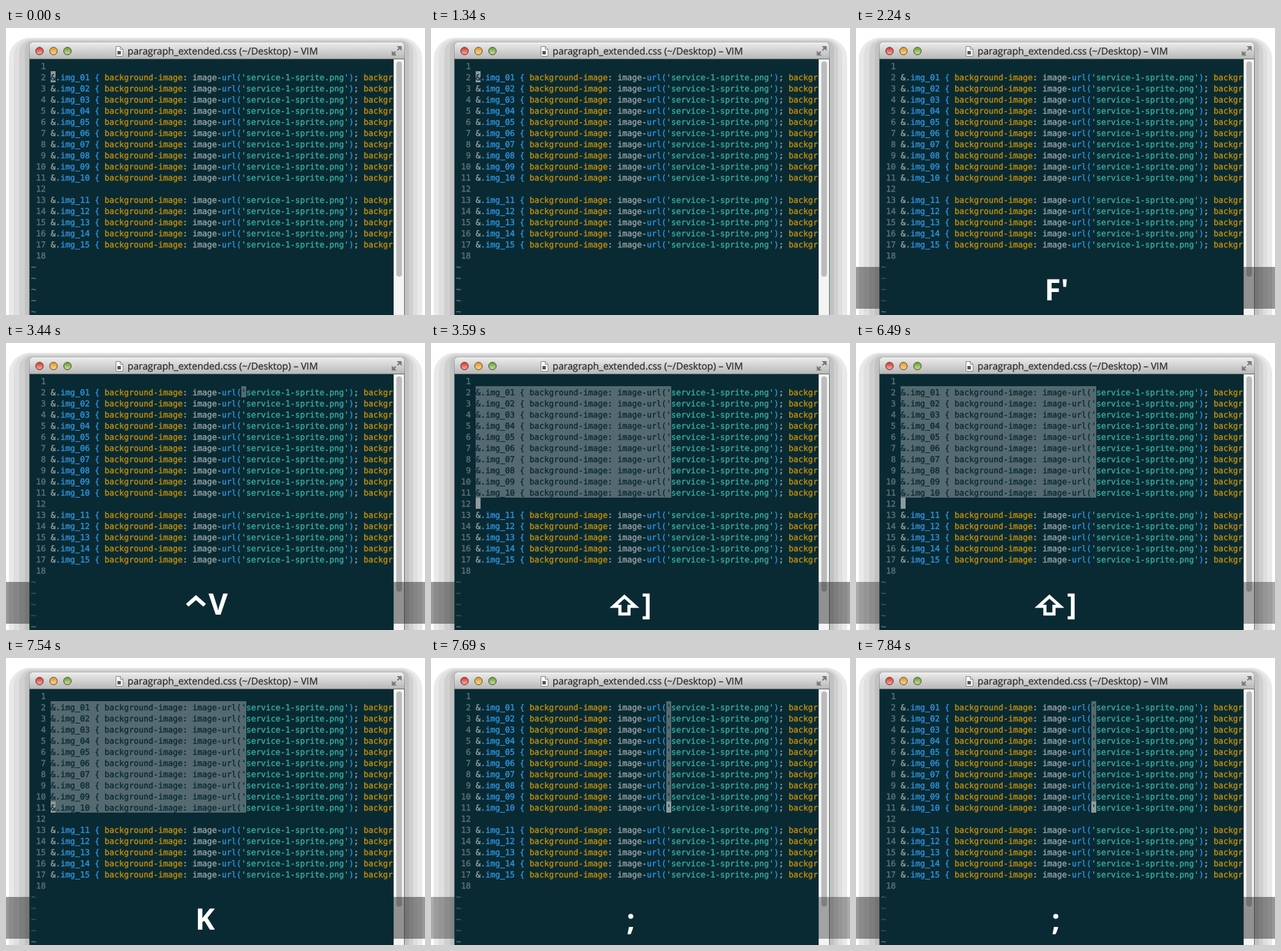
Animation of 600 by 412 pixels, one loop 8000 ms. Source, as an HTML page:

```html
<!DOCTYPE html>
<html lang="en">
<head>
<meta charset="utf-8">
<title>Vim block selection</title>
<style>
  html, body { margin: 0; width: 100%; height: 100%; overflow: hidden; background: #fff; }
  svg { display: block; width: 600px; height: 412px; }
  text { white-space: pre; text-rendering: geometricPrecision; }
  .mono { font: 11.63px "DejaVu Sans Mono", monospace; color: #98a5a5; }
  .mono text, .mono tspan { fill: currentColor; stroke: currentColor; stroke-width: .35px; }
  .dark { color: #0a2a33; }
  .num { color: #5d7379; text-anchor: end; }
  .tilde { color: #647b83; }
  .b { color: #2c95e0; }
  .y { color: #c09008; }
  .c { color: #38aca0; }
  .title { font: 13.77px "Open Sans", "Noto Sans", sans-serif; fill: #2a2a2a; stroke: #2a2a2a; stroke-width: .25px; }
  .key { font: bold 42.5px "Open Sans", "Noto Sans", sans-serif; fill: #fff; }
  .key path { fill: none; stroke: #fff; }
  .note { font: 16.8px "Liberation Sans", Arial, sans-serif; fill: #fb5f43; }
</style>
</head>
<body>
<svg viewBox="0 0 600 412">
  <defs>
    <linearGradient id="bar" x2="0" y2="1">
      <stop offset="0" stop-color="#ececec"/>
      <stop offset="1" stop-color="#b6b6b6"/>
    </linearGradient>
    <linearGradient id="gloss" x2="0" y2="1">
      <stop offset="0" stop-color="#fff" stop-opacity="0"/>
      <stop offset="1" stop-color="#fff" stop-opacity=".6"/>
    </linearGradient>
    <clipPath id="selClip"><rect id="selBox"/></clipPath>
    <clipPath id="curClip"><rect id="curBox"/></clipPath>
    <g id="plain" class="mono dark"></g>
  </defs>

  <!-- window shadow -->
  <rect x="4" y="14" width="592" height="460" rx="30" fill="#e9e9e9"/>
  <rect x="11" y="15" width="578" height="460" rx="25" fill="#dfdfdf"/>
  <rect x="19" y="17" width="564" height="460" rx="18" fill="#d0d0d0"/>
  <rect x="27" y="19" width="550" height="460" rx="11" fill="#c2c2c2"/>

  <!-- window -->
  <path d="M33.5 412V26q0-5 5-5H565.5q5 0 5 5V412z" fill="#0a2a33"/>
  <path d="M33.5 45V26q0-5 5-5H565.5q5 0 5 5V45z" fill="url(#bar)"/>
  <path d="M33.5 44.5H570.5" stroke="#6c6c6c"/>
  <path d="M37 21.5H567" stroke="#f6f6f6"/>
  <g id="lights"></g>
  <path d="M157.5 26.5h6l4 4v10h-10z" fill="#fff" stroke="#8a8a8a"/>
  <path d="M163.5 26.5v4h4" fill="none" stroke="#8a8a8a"/>
  <path d="M159.5 33h5v5h-5z" fill="#555"/>
  <text class="title" x="174" y="38">paragraph_extended.css (~/Desktop) – VIM</text>
  <g fill="#777" stroke="#777" stroke-width="1.8">
    <path d="M560.5 32l4-4M558 34l-4 4"/>
    <path d="M559.5 26h7v7zM552.5 32.5v7h7z" stroke="none"/>
  </g>

  <!-- scroll bar -->
  <rect x="555" y="45" width="15" height="367" fill="#f4f4f4"/>
  <path d="M555.5 45V412" stroke="#dcdcdc"/>
  <rect x="559" y="48" width="8" height="309" rx="4" fill="#bcbcbc"/>

  <g id="code" class="mono"></g>
  <g clip-path="url(#selClip)">
    <rect width="600" height="412" fill="#546a70"/>
    <use href="#plain"/>
  </g>
  <g id="cursor" clip-path="url(#curClip)">
    <rect width="600" height="412" fill="#8e9b9c"/>
    <use href="#plain"/>
  </g>

  <!-- pressed keys -->
  <g id="band">
    <rect y="343" width="600" height="60" fill="#1a1a1a"/>
    <rect x="34" y="343" width="521" height="60" fill="#0a2a33"/>
  </g>
  <g id="find" class="key"><text x="270" y="391">F'</text></g>
  <g id="block" class="key">
    <path d="M259.5 376.5L272 365.5L284.5 376.5" stroke-width="5.5"/>
    <text x="290" y="390">V</text>
  </g>
  <g id="para" class="key">
    <path d="M277 364L261.5 378H270.5V389H283.5V378H292.5z" stroke-width="4.5"/>
    <text x="302" y="390">]</text>
  </g>
  <g id="up" class="key"><text x="271" y="390">K</text></g>
  <g id="again" class="key"><text x="280" y="391">;</text></g>

  <g id="note" class="note">
    <path d="M76.5 239L102 249L94.2 254.4L173 337.5L169.3 341L90.5 258L84 264.5z"/>
    <text x="86" y="367">Cursor goes to the first line column</text>
    <text x="86" y="387">when using } motion.</text>
  </g>
</svg>

<script>
const LOOP = 8000, LEFT = 64, COL = 7, ROW = 16, QUOTE = 39;
const $ = id => document.getElementById(id);
const rowTop = row => 46 + ROW * (row - 1);
const text = (x, row, body, cls = '') =>
  `<text x="${x}" y="${rowTop(row) + 13}" class="${cls}">${body}</text>`;

// Each token is [class, text]; one line of the style sheet.
const tokens = n => [
  ['', '&amp;'], ['b', `.img_${n} { `], ['y', 'background-image'], ['', ': image-'],
  ['b', 'url('], ['c', "'service-1-sprite.png'"], ['b', ')'], ['', '; '], ['y', 'backgr']
];

let code = '', plain = '', image = 0;
for (let row = 1; row <= 23; row++) {
  if (row > 18) {
    code += text(36, row, '~', 'tilde');
    continue;
  }
  code += text(57, row, row, 'num');
  if (row === 1 || row === 12 || row === 18) continue;
  const parts = tokens(String(++image).padStart(2, '0'));
  code += text(LEFT, row, parts.map(([c, s]) => `<tspan class="${c}">${s}</tspan>`).join(''));
  plain += text(LEFT, row, parts.map(p => p[1]).join(''));
}
$('code').innerHTML = code;
$('plain').innerHTML = plain;

$('lights').innerHTML = ['#d8392f', '#dd9a22', '#6da232'].map((fill, i) => {
  const at = `cx="${48 + 20 * i}" cy="33"`;
  return `<circle ${at} r="5.5" fill="${fill}" stroke="#5a4a3c" stroke-opacity=".8"/>
    <circle ${at} r="4.5" fill="url(#gloss)"/>`;
}).join('');

// Boxes are [first column, first row, columns, rows].
const cell = (col, row) => [col, row, 1, 1];
const WIDE = [0, 2, QUOTE + 1, 10], NARROW = [QUOTE, 2, 1, 10];
const FULL = 0.45, SOFT = 0.37;

// Each step changes only the properties it names.
const steps = [
  [0, { cur: cell(0, 2), on: 1, sel: null, band: 0, key: '', note: 0 }],
  [450, { on: 0 }],
  [590, { on: 1 }],
  [1040, { on: 0 }],
  [1340, { on: 1 }],
  [1490, { cur: cell(QUOTE, 2), band: SOFT, key: 'find' }],
  [1640, { band: FULL }],
  [2240, { on: 0 }],
  [2540, { on: 1, band: SOFT }],
  [2690, { sel: cell(QUOTE, 2), band: FULL, key: 'block' }],
  [3440, { on: 0 }],
  [3590, { cur: cell(0, 12), on: 1, sel: WIDE, key: 'para' }],
  [4190, { on: 0 }],
  [4490, { on: 1, key: '', note: 1 }],
  [6490, { band: SOFT, key: 'para', note: 0 }],
  [6640, { cur: cell(0, 11), key: 'up' }],
  [6790, { band: FULL }],
  [7240, { on: 0 }],
  [7540, { on: 1 }],
  [7690, { cur: cell(QUOTE, 11), sel: NARROW, band: SOFT, key: 'again' }],
  [7840, { band: FULL }]
];

function place(id, box) {
  const [col, row, cols, rows] = box || [0, 0, 0, 0];
  const attrs = { x: LEFT + col * COL, y: rowTop(row), width: cols * COL, height: rows * ROW };
  for (const name in attrs) $(id).setAttribute(name, attrs[name]);
}
const show = (id, on) => { $(id).style.display = on ? '' : 'none'; };

function draw(now) {
  const t = now % LOOP;
  const s = Object.assign({}, ...steps.filter(([at]) => at <= t).map(step => step[1]));
  place('selBox', s.sel);
  place('curBox', s.cur);
  show('cursor', s.on);
  show('note', s.note);
  $('band').setAttribute('opacity', s.band);
  for (const id of ['find', 'block', 'para', 'up', 'again']) show(id, id === s.key);
}

let start;
function tick(now) {
  start ??= now;
  draw(now - start);
  requestAnimationFrame(tick);
}
draw(0);
requestAnimationFrame(tick);
</script>
</body>
</html>
```
